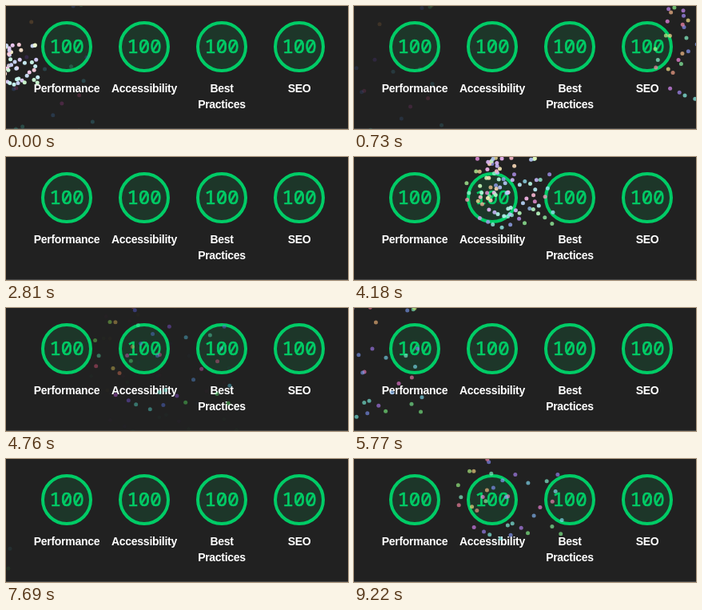
Animation of 428 by 154 pixels, one loop 9.24 s. Source, as an HTML page with a canvas:

```html
<!DOCTYPE html>
<html lang="en">
<head>
<meta charset="utf-8">
<title>Audit scores</title>
<style>
  html, body { margin: 0; width: 100%; height: 100%; overflow: hidden; background: #212121; }
  svg, canvas { position: absolute; left: 0; top: 0; width: 428px; height: 154px; }
  .ring { fill: #00cc66; fill-opacity: .12; stroke: #00cc66; stroke-width: 4; }
  .score {
    font: 24px "Noto Sans Mono", "DejaVu Sans Mono", monospace;
    fill: #00cc66; stroke: #00cc66; stroke-width: .7;
  }
  .label { font: bold 14px "Liberation Sans", Arial, sans-serif; letter-spacing: -.28px; fill: #fff; }
  text { text-anchor: middle; }
</style>
</head>
<body>
<svg id="scores" viewBox="0 0 428 154"><rect y="153" width="428" height="1" fill="#484848"/></svg>
<canvas id="sky" width="428" height="154"></canvas>
<script>
const LOOP = 9240;
const WIDTH = 1056, LEFT = -305.3, TOP = 11, FALL = 80;

// Where each burst goes off, as fractions of the page width
const SPOTS = [[.47, .04], [.30, .07], [.70, .06], [.20, .03], [.80, .03]];

// Two launchers; start is the time of a burst at the first spot
const LAUNCHERS = [
  { start: 3785, length: 988 },
  { start: 3862, length: 1235 }
];

// Nothing moves between these times
const PAUSES = [[2810, 3890], [7690, 8460]];

function seeded(seed) {
  return () => {
    seed = (Math.imul(seed, 1664525) + 1013904223) >>> 0;
    return seed / 2 ** 32;
  };
}

// Sparks fly mostly upwards, each with its own hue
const random = seeded(51);
const between = (lo, hi) => lo + (hi - lo) * random();
const sparks = Array.from({ length: 51 }, () => ({
  dx: between(-94, 97),
  dy: between(-163, 33),
  hue: between(0, 345)
}));

function bezier(x1, y1, x2, y2) {
  const at = (a, b, u) => 3 * u * (1 - u) * (1 - u) * a + 3 * u * u * (1 - u) * b + u * u * u;
  return x => {
    let lo = 0, hi = 1;
    for (let i = 0; i < 24; i++) {
      const mid = (lo + hi) / 2;
      if (at(x1, x2, mid) < x) lo = mid; else hi = mid;
    }
    return at(y1, y2, lo);
  };
}
const easeOut = bezier(0, 0, .58, 1);
const easeIn = bezier(.42, 0, 1, 1);

function buildScores() {
  const svg = document.getElementById("scores");
  const add = (tag, attrs, text = "") => {
    const el = document.createElementNS(svg.namespaceURI, tag);
    for (const key in attrs) el.setAttribute(key, attrs[key]);
    el.textContent = text;
    svg.append(el);
  };
  [["Performance"], ["Accessibility"], ["Best", "Practices"], ["SEO"]].forEach((lines, i) => {
    const x = 76 + 97 * i;
    add("circle", { class: "ring", cx: x, cy: 51, r: 30 });
    add("text", { class: "score", x, y: 59 }, "100");
    lines.forEach((line, row) => add("text", { class: "label", x, y: 108 + 20 * row }, line));
  });
}

const ctx = document.getElementById("sky").getContext("2d");

function drawBurst([left, top], age) {
  const spread = easeOut(age), drop = easeIn(age);
  const x = LEFT + left * WIDTH + 2.5;
  const y = TOP + top * WIDTH + 2.5 + FALL * drop;
  ctx.globalAlpha = 1 - drop;
  for (const { dx, dy, hue } of sparks) {
    ctx.fillStyle = `hsl(${hue}, 80%, ${100 - 40 * spread}%)`;
    ctx.beginPath();
    ctx.arc(x + dx * spread, y + dy * spread, 2.5, 0, 2 * Math.PI);
    ctx.fill();
  }
}

function draw(time) {
  for (const [from, to] of PAUSES) if (time > from && time < to) time = from;
  ctx.clearRect(0, 0, 428, 154);
  for (const { start, length } of LAUNCHERS) {
    const turn = (time - start) / length + SPOTS.length;
    const step = Math.floor(turn);
    drawBurst(SPOTS[step % SPOTS.length], turn - step);
  }
}

function tick() {
  draw(performance.now() % LOOP);
  requestAnimationFrame(tick);
}

buildScores();
tick();
</script>
</body>
</html>
```
